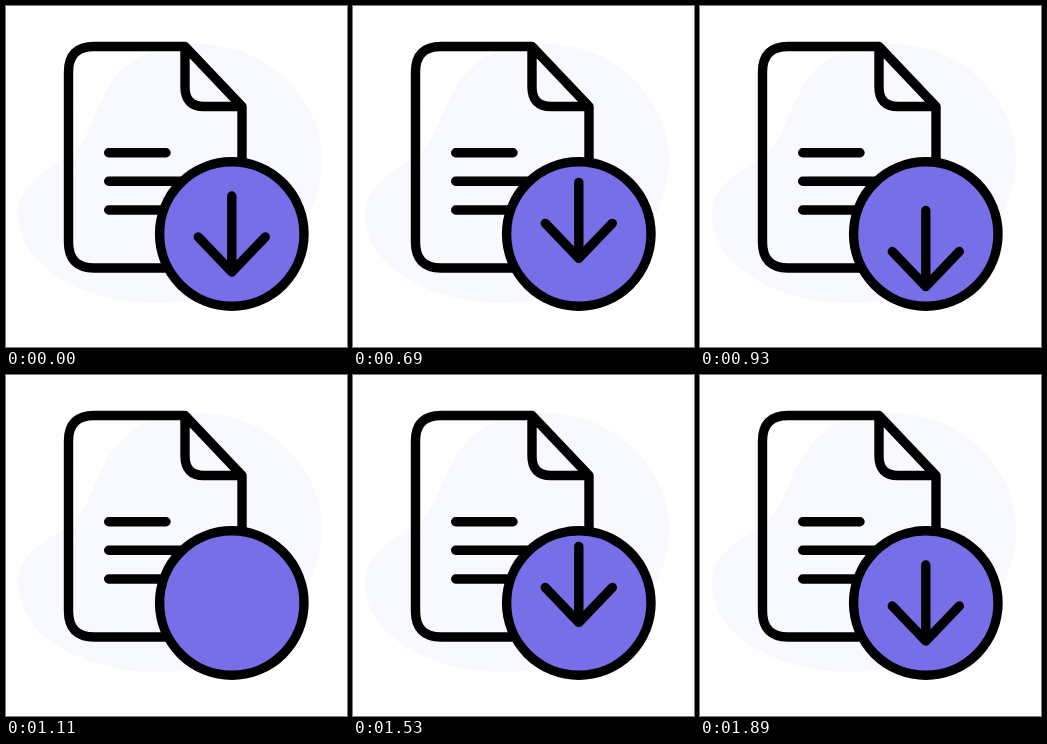
An HTML page for the animation above (2.64 s loop, 341 px wide and 341 px high).

```html
<!DOCTYPE html>
<html>
<head>
<meta charset="utf-8">
<style>
  html, body { margin: 0; height: 100%; overflow: hidden; background: #fff; }
  svg { display: block; width: 100%; height: 100%; }
</style>
</head>
<body>
<svg viewBox="0 0 341 341" fill="none" stroke="#000" stroke-width="9.4" stroke-linecap="round" stroke-linejoin="round">
  <clipPath id="disc"><circle cx="225.8" cy="228" r="70"/></clipPath>
  <path fill="#f8f8ff" stroke="none" d="M188 38C262 36 316 94 316 153C316 196 296 224 270 250C240 280 196 297 150 297C80 297 12 262 12 208C12 182 36 166 60 153C100 130 82 40 188 38Z"/>
  <path d="M179 40.5H88Q62.5 40.5 62.5 66V236Q62.5 262 88 262H165M179 40.5V81Q179 100.5 198 100.5H236L179 40.5M236 100.5V160"/>
  <path d="M102.7 146.8H160M102.7 175.2H175M102.7 204H160"/>
  <circle cx="225.8" cy="228" r="72.2" fill="#766fe8"/>
  <g clip-path="url(#disc)">
    <path id="arrow" d="M225.8 190V266M192.3 231L225.8 266L259.3 231"/>
  </g>
</svg>
<script>
const LOOP = 2640, LIFT = 540, DROP = 750, ENTER = 1260, REST = 1890;
const RISE = 16.7, HIDDEN = 112;
const arrow = document.getElementById('arrow');

// Remaining distance (1 to 0) along cubic-bezier(.25, 1, .708, 1)
function remaining(u) {
  let lo = 0, hi = 1;
  for (let i = 0; i < 24; i++) {
    const s = (lo + hi) / 2, r = 1 - s;
    const x = 3 * r * r * s * 0.25 + 3 * r * s * s * 0.708 + s ** 3;
    if (x < u) lo = s; else hi = s;
  }
  return (1 - lo) ** 3;
}

function offset(t) {
  if (t < LIFT || t >= REST) return 0;
  if (t < DROP) return -RISE * (1 - Math.cos(Math.PI * (t - LIFT) / (DROP - LIFT))) / 2;
  if (t < ENTER) return -RISE + 140 * ((t - DROP) / 360) ** 2.18;
  return -HIDDEN * remaining((t - ENTER) / (REST - ENTER));
}

const start = performance.now();
function draw() {
  const t = (performance.now() - start) % LOOP;
  arrow.setAttribute('transform', `translate(0 ${offset(t).toFixed(2)})`);
  requestAnimationFrame(draw);
}
draw();
</script>
</body>
</html>
```
